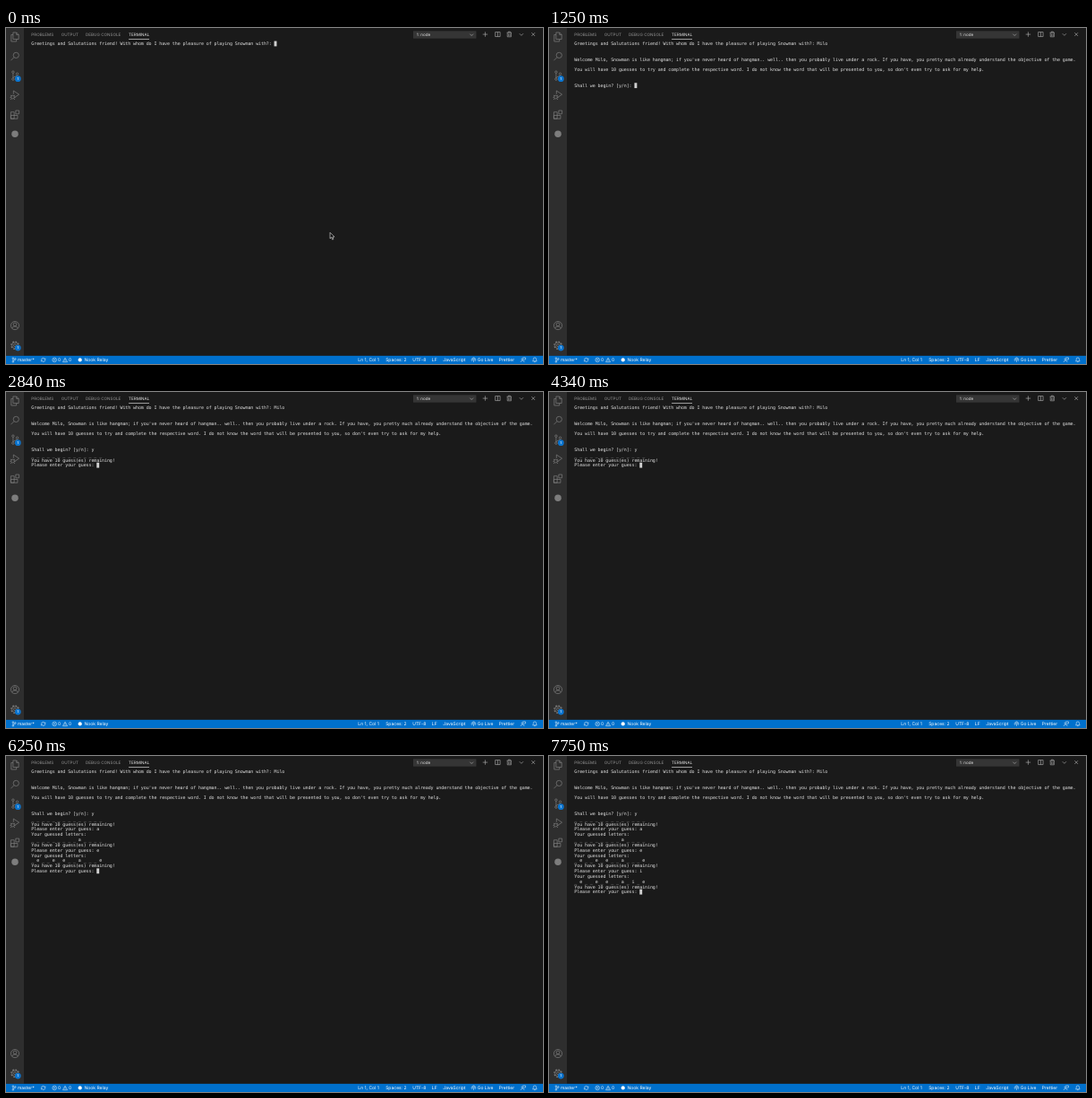
Animation, 600 px wide and 375 px high, one loop 8000 ms. Source, as an HTML page:

```html
<!DOCTYPE html>
<html lang="en">
<head>
<meta charset="utf-8">
<title>Snowman in the terminal</title>
<style>
  html, body { margin: 0; width: 100%; height: 100%; overflow: hidden; background: #1a1a1a; }
  svg { display: block; width: 100%; height: 100%; }
  text { font-family: Inter, "Open Sans", sans-serif; text-rendering: geometricPrecision; white-space: pre; }
  .tabs text { font-size: 11px; fill: #969696; }
  .tabs .active { fill: #e7e7e7; }
  .term text { font: 12px "DejaVu Sans Mono", monospace; letter-spacing: -0.224px; fill: #e0e0e0; }
  .icons { fill: none; stroke: #7d7d7d; stroke-width: 1.7; }
  .tools { fill: none; stroke: #c5c5c5; stroke-width: 1.3; }
  .status text { font-size: 12px; fill: #fff; }
  .status .marks { fill: none; stroke: #fff; stroke-width: 1.2; }
  .badge circle { fill: #0a74cf; }
  .badge text { font-size: 9px; font-weight: 600; fill: #fff; text-anchor: middle; }
</style>
</head>
<body>
<svg viewBox="0 0 1440 900" preserveAspectRatio="none">
  <rect width="1440" height="900" fill="#1a1a1a"/>
  <rect width="48" height="878" fill="#2e2e2e"/>

  <g class="icons">
    <!-- files, search -->
    <path d="M19 12h9l6 6v12H19zM28 12v6h6M19 18h-5v18h14v-6"/>
    <circle cx="27" cy="73" r="7.5"/><path d="M21.500 78.500 13 87"/>
    <!-- branches -->
    <circle cx="19" cy="118" r="3"/><circle cx="19" cy="137" r="3"/><circle cx="30" cy="123" r="3"/>
    <path d="M19 121v13M30 126c0 5-11 3-11 8"/>
    <!-- run and debug -->
    <path d="M20 177V168l15 10-12 8"/>
    <circle cx="18" cy="185" r="4.500"/><path d="M12 180l3 2M24 180l-3 2M11 186h3M22 186h3M12 192l3-3M24 192l-3-3"/>
    <!-- extensions -->
    <path d="M13 225h9v18h-9zM13 234h18v9H13zM26 221h9v9h-9z"/>
    <!-- account -->
    <circle cx="24" cy="797" r="11"/><circle cx="24" cy="794" r="4.500"/><path d="M16 804.500c2-7 14-7 16 0"/>
    <!-- settings -->
    <circle cx="24" cy="850" r="3.500"/><circle cx="24" cy="850" r="8"/>
    <circle cx="24" cy="850" r="10" stroke-width="3" stroke-dasharray="4 3.854"/>
  </g>
  <circle cx="24" cy="284" r="9" fill="#7d7d7d"/>
  <g class="badge">
    <circle cx="32" cy="136" r="8"/><text x="32" y="139.300">1</text>
    <circle cx="32" cy="857" r="8"/><text x="32" y="860.300">1</text>
  </g>

  <g class="tabs">
    <text x="68" y="22">PROBLEMS</text>
    <text x="148" y="22">OUTPUT</text>
    <text x="213.500" y="22">DEBUG CONSOLE</text>
    <text class="active" x="329" y="22">TERMINAL</text>
    <rect x="329" y="29.500" width="55" height="1.500" fill="#e7e7e7"/>
    <rect x="1092" y="8" width="169" height="20" fill="#353535"/>
    <text class="active" x="1101" y="22">1: node</text>
  </g>
  <g class="tools">
    <path d="M1244 16l4.500 4.500 4.500-4.500M1278.500 17h13M1285 10.500v13"/>
    <path d="M1312 11h13v12h-13zM1318.500 11v12"/>
    <path d="M1343 12.500h13M1347 12v-2h5v2M1344.500 13v10.500h10V13M1348 15.500v6M1351.500 15.500v6"/>
    <path d="M1377 15l5 5 5-5M1409.500 12.500l9 9M1418.500 12.500l-9 9"/>
  </g>

  <g class="term" id="term"><rect id="caret" width="7" height="14" fill="#d0d0d0"/></g>

  <g class="status">
    <rect y="878" width="1440" height="22" fill="#0070cc"/>
    <g class="marks">
      <!-- branch, sync -->
      <circle cx="19" cy="884.500" r="1.800"/><circle cx="19" cy="894" r="1.800"/><circle cx="25" cy="886.500" r="1.800"/>
      <path d="M19 886v6M25 888c0 3-6 1-6 4"/>
      <path d="M94.500 889a5.300 5.300 0 0 1 10-2M105.500 889a5.300 5.300 0 0 1-10 2M102 887.500h3.500v-3M98 890.500h-3.500v3"/>
      <!-- errors, warnings -->
      <circle cx="130" cy="889" r="5.500"/><path d="M127.500 886.500l5 5M132.500 886.500l-5 5"/>
      <path d="M158.500 883.500l6 11h-12zM158.500 887.500v3.500M158.500 892v1.300"/>
      <!-- broadcast, feedback, bell -->
      <path d="M1250 892.500a5.500 5.500 0 1 1 8 0M1252 890a2.600 2.600 0 1 1 4 0M1254 888.500v6.500"/>
      <circle cx="1385" cy="887" r="2.300"/><path d="M1380.500 895c0-6 9-6 9 0M1386 883h7v5h-2l-2 2"/>
      <path d="M1412.500 892.500h11l-1.500-2.500v-3a4 4 0 0 0-8 0v3zM1416.500 893a1.500 1.500 0 0 0 3 0"/>
    </g>
    <circle cx="198.500" cy="889" r="5" fill="#fff"/>
    <text x="31" y="893.300">master*</text>
    <text x="139" y="893.300">0</text>
    <text x="168" y="893.300">0</text>
    <text x="210" y="893.300">Nook Relay</text>
    <text x="944" y="893.300">Ln 1, Col 1</text>
    <text x="1018" y="893.300">Spaces: 2</text>
    <text x="1090" y="893.300">UTF-8</text>
    <text x="1142" y="893.300">LF</text>
    <text x="1172" y="893.300">JavaScript</text>
    <text x="1264" y="893.300">Go Live</text>
    <text x="1322" y="893.300">Prettier</text>
  </g>

  <path id="pointer" d="M869 548v16l3.700-3.500 2.600 6.200 2.800-1.200-2.600-6h5z" fill="#000" stroke="#fff" stroke-width="1.400"/>
</svg>

<script>
  const LOOP = 8000, LEFT = 68, TOP = 35, COL = 7, ROW = 14, ROWS = 24;
  const NAME = "Milo", WORD = "representative";
  const term = document.getElementById("term");
  const caret = document.getElementById("caret");
  const pointer = document.getElementById("pointer");

  // The secret word with only the guessed letters showing.
  const masked = (guessed) =>
    [...WORD].map((c) => (guessed.includes(c) ? c : "_")).join(" ");
  const turn = (guessed) =>
    `\n${masked(guessed)}\nYou have 10 guess(es) remaining!\nPlease enter your guess: `;
  const nextTurn = (guessed) => "\nYour guessed letters:" + turn(guessed);

  const intro = `\n\n\nWelcome ${NAME}, Snowman is like hangman; if you've never heard of hangman.. well.. ` +
    "then you probably live under a rock. If you have, you pretty much already understand the objective of the game." +
    "\n\nYou will have 10 guesses to try and complete the respective word. " +
    "I do not know the word that will be presented to you, so don't even try to ask for my help." +
    "\n\n\nShall we begin? [y/n]: ";

  // Time in ms, text added to the terminal.
  const steps = [
    [0, "Greetings and Salutations friend! With whom do I have the pleasure of playing Snowman with?: "],
    [420, NAME[0]], [590, NAME[1]], [750, NAME[2]], [920, NAME[3]],
    [1250, intro],
    [2840, "y" + turn("")],
    [4750, "a"], [5000, nextTurn("a")],
    [6090, "e"], [6250, nextTurn("ae")],
    [7420, "i"], [7750, nextTurn("aei")],
  ];

  const rows = Array.from({ length: ROWS }, (_, i) => {
    const row = document.createElementNS("http://www.w3.org/2000/svg", "text");
    row.setAttribute("x", LEFT);
    row.setAttribute("y", TOP + ROW * i + 11);
    return term.appendChild(row);
  });

  let shown = 0;
  function draw(time) {
    const done = steps.filter(([at]) => at <= time);
    if (done.length === shown) return;
    shown = done.length;
    const lines = done.map(([, text]) => text).join("").split("\n");
    rows.forEach((row, i) => { row.textContent = lines[i] || ""; });
    const last = lines.length - 1;
    caret.setAttribute("x", LEFT + COL * lines[last].length);
    caret.setAttribute("y", TOP + ROW * last);
    // Typing hides the pointer.
    pointer.style.display = shown > 1 ? "none" : "";
  }

  const start = performance.now();
  function tick() {
    draw((performance.now() - start) % LOOP);
    requestAnimationFrame(tick);
  }
  tick();
</script>
</body>
</html>
```
